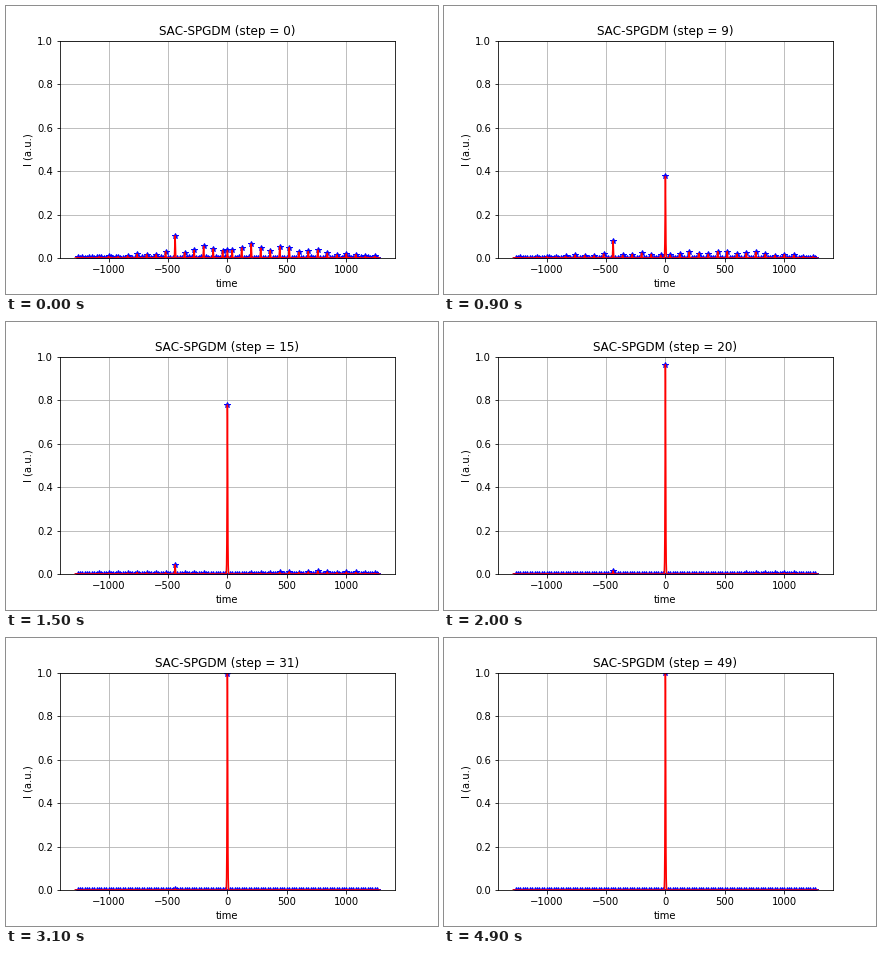
Animation of 432x288 px, one loop 5 s. Source, as a matplotlib script:

```python
import numpy as np
import matplotlib.pyplot as plt
from matplotlib.animation import FuncAnimation

plt.rcParams.update({"font.family": "DejaVu Sans", "text.kerning_factor": 6})

STEPS = 50
SPACING = 20
PULSE_WIDTH = 3.3
STRONG_DELAY = -440  # the one side pulse that resists suppression

delays = np.arange(-1260, 1261, SPACING)
rng = np.random.default_rng(4)

# Every fourth delay carries a visible pulse under a rippled bell envelope
ripple = 1 + 0.3 * np.cos(2 * np.pi * (np.abs(delays) - 200) / 280)
envelope = 0.05 * ripple * np.exp(-((delays - 150) / 800) ** 2)
start = np.where(delays % 80 == 40, envelope, 0.003 * rng.random(delays.size))
decay = 0.5 + 1.8 * np.exp(-(delays / 500) ** 2)  # outer pulses fade slower
start[delays == STRONG_DELAY] = 0.102
decay[delays == STRONG_DELAY] = 0.6

# Fine samples around every pulse keep the narrow peaks exact
offsets = np.linspace(-SPACING / 2, SPACING / 2, 21)
shape = 1 / np.cosh(offsets / PULSE_WIDTH) ** 2
shape[[0, -1]] = 0
line_x = np.r_[-1280, (delays[:, None] + offsets).ravel(), 1280]


def main_peak(step):
    logit = np.interp(step, [0, 9, 15, 20, 31, 49],
                      [-3.32, -0.51, 1.25, 3.25, 5.2, 7])
    return 1 / (1 + np.exp(-logit))


def pulse_heights(step):
    peak = main_peak(step)
    remaining = (1 - peak) / (1 - main_peak(0))
    return np.where(delays == 0, peak, start * remaining ** decay)


fig = plt.figure(figsize=(6, 4), dpi=72, facecolor="white")
fig.subplots_adjust(left=0.125, right=0.9, bottom=0.125, top=0.88)
ax = fig.add_subplot()
ax.set(xlim=(-1408, 1408), ylim=(0, 1), xlabel="time", ylabel="I (a.u.)")
ax.grid(True)
title = ax.set_title("")
stars, = ax.plot([], [], "b*")
trace, = ax.plot([], [], "r-")


def update(step):
    heights = pulse_heights(step)
    stars.set_data(delays, heights)
    trace.set_data(line_x, np.r_[0, np.outer(heights, shape).ravel(), 0])
    title.set_text(f"SAC-SPGDM (step = {step})")
    return stars, trace, title


anim = FuncAnimation(fig, update, frames=STEPS, interval=100,
                     repeat=True, repeat_delay=0)
plt.show()
```
